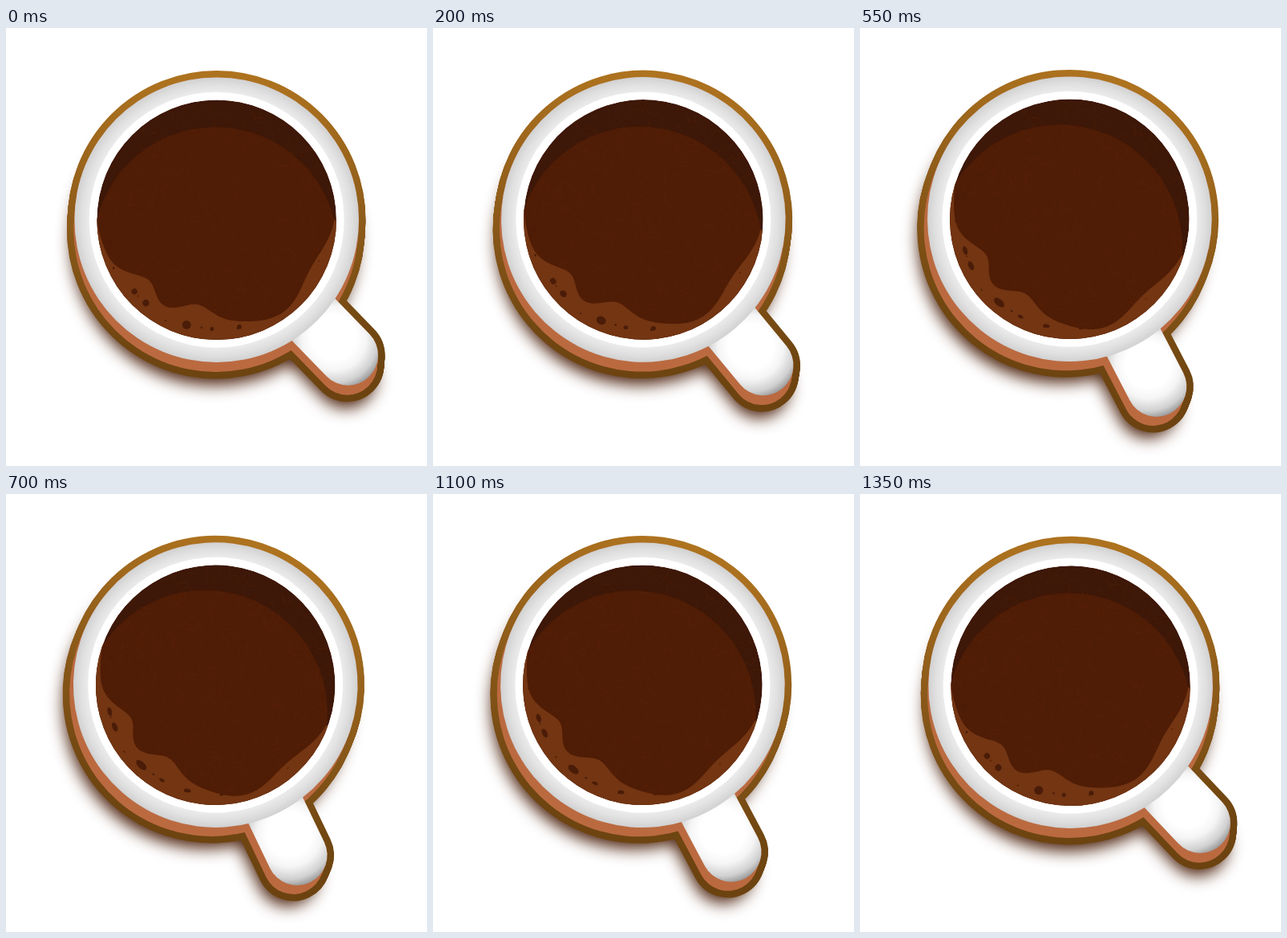
Recreate the animation shown at these times as an HTML page with a canvas. Size 525 by 545 pixels, loop 1400 ms.

```html
<!DOCTYPE html>
<html>
<head>
<meta charset="utf-8">
<title>Coffee cup</title>
<style>
  html, body { margin: 0; height: 100%; overflow: hidden; background: #fff; }
  canvas { display: block; }
</style>
</head>
<body>
<canvas id="stage" width="525" height="545"></canvas>
<script>
const ctx = document.getElementById('stage').getContext('2d');
const LOOP = 1400, STEP = 50, RISE_END = 900, FALL_START = 1000, PEAK = 18.9;
const TAU = Math.PI * 2, RAD = Math.PI / 180;
const CUP_R = 177.3, COFFEE_R = 149.3;
const HANDLE = { angle: 45.8 * RAD, reach: 235, half: 37.5 };
const SIDE = [-1, 12];

const wave = u => (1 - Math.cos(Math.PI * u)) / 2;

// Cup angle in degrees: quick rise that slows down, short rest, smooth return
function swingAt(t) {
  if (t < RISE_END) return PEAK * wave(1 - (1 - t / RISE_END) ** 1.6);
  if (t < FALL_START) return PEAK;
  return PEAK * wave((LOOP - t) / (LOOP - FALL_START));
}

function seeded(seed) {
  return () => (seed = seed * 16807 % 2147483647) / 2147483647;
}

function circlePath(r, x = 0, y = 0) {
  const p = new Path2D();
  p.arc(x, y, r, 0, TAU);
  return p;
}

function handlePath() {
  const { angle, reach, half } = HANDLE, c = Math.cos(angle), s = Math.sin(angle);
  const p = new Path2D();
  p.arc(reach * c, reach * s, half, angle - TAU / 4, angle + TAU / 4);
  p.lineTo(100 * c - half * s, 100 * s + half * c);
  p.lineTo(100 * c + half * s, 100 * s - half * c);
  p.closePath();
  return p;
}

// Foam lies along the coffee's rim; each bump: angle, depth, width
const BUMPS = [[28, 19, 16], [78, 18, 14], [104, 39, 12], [138, 37, 11], [166, 5, 9]];

function foamPath() {
  const p = new Path2D();
  for (let deg = 0; deg <= 185; deg++) {
    const depth = BUMPS.reduce((sum, [at, size, width]) =>
      sum + size * Math.exp(-(((deg - at) / width) ** 2) / 2), -1.5);
    const r = COFFEE_R - depth;
    p.lineTo(r * Math.cos(deg * RAD), r * Math.sin(deg * RAD));
  }
  p.arc(0, 0, 170, 185 * RAD, 0, true);
  p.closePath();
  return p;
}

// Bubbles as angle, size, distance: six big ones, the rest tiny
function makeBubbles() {
  const rnd = seeded(11);
  const big = [[78, 2.9], [92.5, 2.5], [106, 5.4], [130.5, 4.1], [139, 3.7], [168, 2.4]];
  const tiny = Array.from({ length: 8 }, (_, i) => [22 + i * 19, 0.8 + rnd(), 132 + rnd() * 12]);
  return [...big, ...tiny];
}

// Faint swirls in the coffee
function swirlPath() {
  const rnd = seeded(7), p = new Path2D();
  for (let i = 0; i < 420; i++) {
    const r = COFFEE_R * Math.sqrt(rnd()), a = rnd() * TAU, from = rnd() * TAU, size = 3 + rnd() * 9;
    const x = r * Math.cos(a), y = r * Math.sin(a);
    p.moveTo(x + size * Math.cos(from), y + size * Math.sin(from));
    p.arc(x, y, size, from, from + 1 + rnd() * 1.5);
  }
  return p;
}

function gradient(g, ...stops) {
  stops.forEach(([at, color]) => g.addColorStop(at, color));
  return g;
}

const cup = circlePath(CUP_R), ring = circlePath(159), coffee = circlePath(COFFEE_R);
const lit = circlePath(153, -1.5, 37.5);
const handle = handlePath(), foam = foamPath(), swirls = swirlPath(), bubbles = makeBubbles();
const body = new Path2D(cup);
body.addPath(handle);

const outline = gradient(ctx.createLinearGradient(0, -186, 0, 200),
  [0, '#ae731f'], [0.5, '#8a5919'], [0.85, '#704611'], [1, '#6c4310']);
const rim = gradient(ctx.createRadialGradient(0, 0, 159, 0, 0, CUP_R),
  [0, '#ebebeb'], [0.5, '#e0e0e0'], [1, '#d1d1d1']);
const hx = 211 * Math.cos(HANDLE.angle), hy = 211 * Math.sin(HANDLE.angle);
const gloss = gradient(ctx.createRadialGradient(hx - 1, hy - 5, 28, hx, hy - 2, 63),
  [0, '#fff'], [0.35, '#f5f5f5'], [0.75, '#d0d0d0'], [1, '#999']);

function fill(path, style) {
  ctx.fillStyle = style;
  ctx.fill(path);
}

function extrude(paint) {
  for (let i = 0; i <= 12; i++) {
    ctx.save();
    ctx.translate(SIDE[0] * i / 12, SIDE[1] * i / 12);
    paint();
    ctx.restore();
  }
}

function drawShadow() {
  ctx.save();
  ctx.translate(-3, 28);
  ctx.shadowColor = '#4a1f0a';
  ctx.shadowBlur = 20;
  // Only the blurred copy is wanted, so the shape itself is kept off stage
  ctx.shadowOffsetX = 2000;
  const m = ctx.getTransform();
  ctx.setTransform(m.a, m.b, m.c, m.d, m.e - 2000, m.f);
  fill(body, '#000');
  ctx.restore();
}

function drawCoffee(degrees) {
  ctx.save();
  ctx.clip(coffee);
  fill(coffee, '#3d1707');
  fill(lit, '#4f1c05');
  ctx.strokeStyle = 'rgba(130, 60, 20, 0.13)';
  ctx.lineWidth = 1;
  ctx.stroke(swirls);
  // The foam drifts a little past the cup, its bubbles more so
  ctx.rotate(degrees * 0.08 * RAD);
  fill(foam, '#733512');
  ctx.rotate(degrees * 0.37 * RAD);
  const stretch = 0.5 * degrees / PEAK;
  ctx.fillStyle = '#4a1c08';
  for (const [deg, size, r = 136] of bubbles) {
    const a = deg * RAD;
    ctx.beginPath();
    ctx.ellipse(r * Math.cos(a), r * Math.sin(a), size * (1 - stretch / 2), size * (1 + stretch), a, 0, TAU);
    ctx.fill();
  }
  ctx.restore();
}

function draw(t) {
  const degrees = swingAt(t);
  ctx.fillStyle = '#fff';
  ctx.fillRect(0, 0, 525, 545);
  ctx.save();
  ctx.translate(262.7 - degrees * 0.08, 238.7 - degrees * 0.06);
  ctx.rotate(degrees * RAD);
  drawShadow();
  ctx.strokeStyle = outline;
  ctx.lineWidth = 17;
  ctx.lineJoin = 'round';
  extrude(() => ctx.stroke(body));
  extrude(() => fill(body, '#bb6a40'));
  fill(handle, gloss);
  fill(cup, rim);
  fill(ring, '#fff');
  drawCoffee(degrees);
  ctx.restore();
}

const start = performance.now();
function tick() {
  const t = (performance.now() - start) % LOOP;
  draw(Math.floor(t / STEP) * STEP);
  requestAnimationFrame(tick);
}
tick();
</script>
</body>
</html>
```
